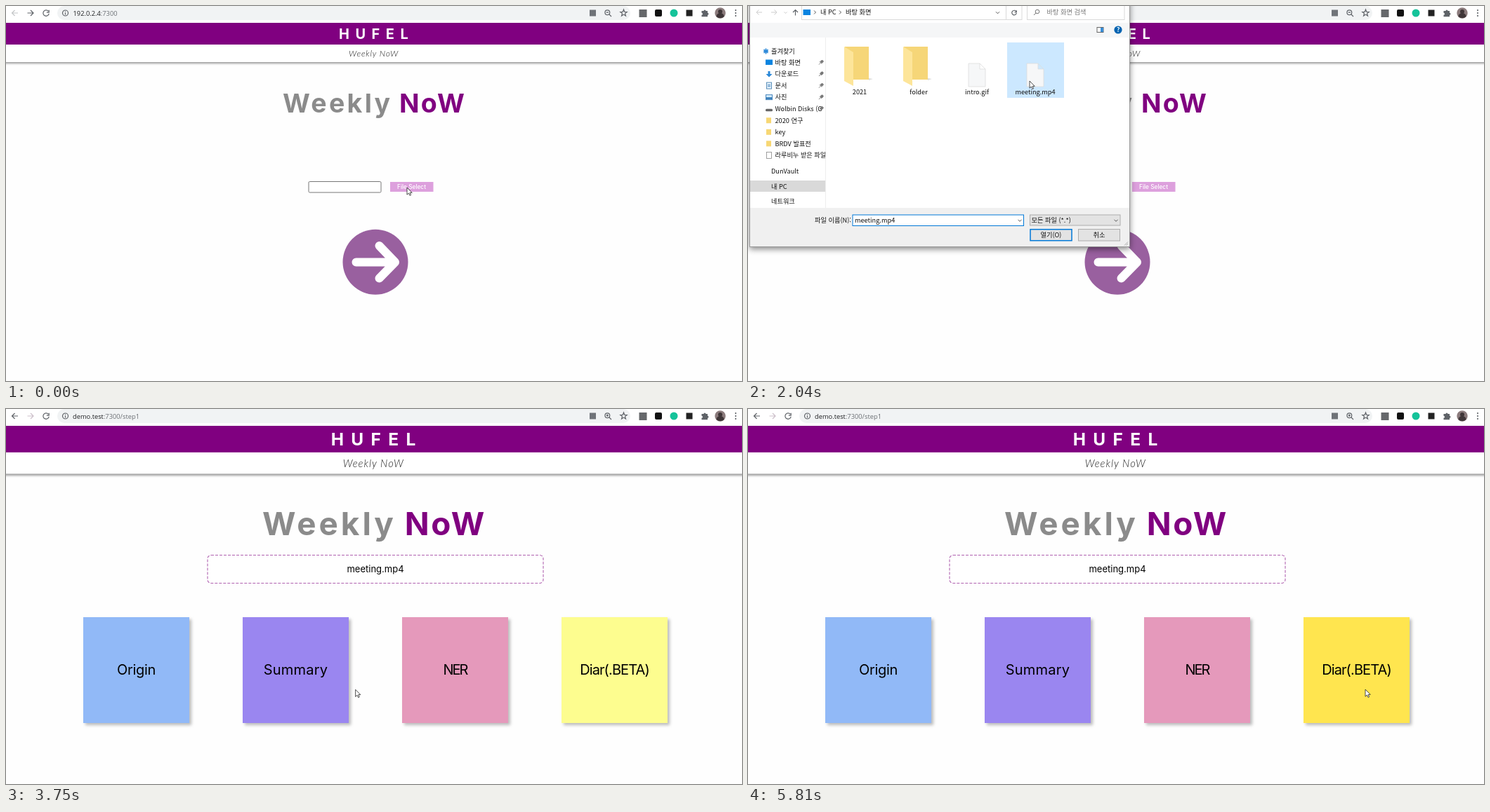
Write an HTML page that moves like this. It is 1048 by 535 pixels and loops after 6370 ms.

```html
<!DOCTYPE html>
<html lang="ko">
<head>
<meta charset="utf-8">
<title>Weekly NoW</title>
<style>
  html, body { margin: 0; width: 100%; height: 100%; overflow: hidden; background: #fefefe; }
  svg { display: block; width: 100%; height: 100%; }
  text { font-family: Inter, sans-serif; white-space: pre; }
  .ui { font: 9.3px "Open Sans", "Noto Sans", sans-serif; fill: #202124; }
  .win text { font: 9.2px "Noto Sans CJK KR", "Noto Sans CJK", sans-serif; fill: #111; }
  .line { fill: none; stroke: #5f6368; stroke-width: 1.2; }
  .mid { text-anchor: middle; }
  .nav { filter: drop-shadow(0 2px 1.5px #0006); }
  .card rect { filter: drop-shadow(3px 3px 2px #0004); }
  .dialog { filter: drop-shadow(0 3px 4px #0007); }
</style>
</head>
<body>
<svg id="stage" viewBox="0 0 1048 535"></svg>
<script>
const LOOP = 6370;
const stage = document.getElementById('stage');

const text = (x, y, s, attrs = '') => `<text x="${x}" y="${y}" ${attrs}>${s}</text>`;
const rect = (x, y, w, h, fill, attrs = '') =>
  `<rect x="${x}" y="${y}" width="${w}" height="${h}" fill="${fill}" ${attrs}/>`;
const path = (d, attrs = 'class="line"') => `<path d="${d}" ${attrs}/>`;
const circle = (x, y, r, attrs) => `<circle cx="${x}" cy="${y}" r="${r}" ${attrs}/>`;
const group = (id, body, attrs = '') => `<g id="${id}" ${attrs}>${body}</g>`;
const chevron = (x, y) => path(`M${x - 2.5} ${y - 1.2}l2.5 2.5 2.5 -2.5`, 'fill="none" stroke="#555"');

const reload = (x, y, r) =>
  path(`M${x + r * .8} ${y - r * .6}A${r} ${r} 0 1 0 ${x + r} ${y + r * .2}M${x + r} ${y - r}v${r * .8}h${-r * .8}`);

const toolbar = rect(0, 0, 1048, 24, '#fff') +
  rect(73, 0, 816, 20, '#f1f3f4', 'rx="10"') +
  path('M17 10H8.500M12.500 6L8.500 10L12.500 14', 'id="back" class="line"') +
  path('M30.500 10H39M35 6L39 10L35 14', 'id="forward" class="line"') +
  group('reload', reload(57, 10, 4.2)) +
  group('stop', path('M53 6L61 14M61 6L53 14')) +
  circle(84.5, 10, 4, 'class="line"') + path('M84.500 9.500V12.500M84.500 7.500V8.500') +
  group('url1', text(95.5, 13.5, '192.0.2.4<tspan fill="#6b6f74">:7300</tspan>', 'class="ui"')) +
  group('url2', text(95, 13.5, 'demo.test<tspan fill="#6b6f74">:7300/step1</tspan>', 'class="ui"')) +
  rect(831, 5.5, 9, 9, '#6f7378') +
  circle(856.3, 9.2, 3.4, 'class="line"') + path('M858.800 11.800L862 15M854.600 9.200H858') +
  path('M856.300 7.500V10.900', 'id="plus" class="line"') +
  path('M879.500 5l1.230 3.300 3.530.150-2.760 2.200.940 3.400-2.940-1.950-2.940 1.950.940-3.400-2.760-2.200 3.530-.150z') +
  rect(901.5, 5, 11, 11, '#66686b') +
  rect(924, 5, 10, 10, '#111', 'rx="2"') +
  circle(951, 10, 5.5, 'fill="#15c39a"') +
  rect(968.5, 5.5, 9, 9, '#222') +
  path('M990.500 7h3a1.500 1.500 0 0 1 3 0h2.500v2.700a1.500 1.500 0 0 1 0 3v2.500h-8.500v-2.500a1.500 1.500 0 0 0 0-3z', 'fill="#5f6368"') +
  circle(1017, 10, 7.7, 'fill="#8b7b7c"') + circle(1017, 8, 3, 'fill="#3f3638"') +
  path('M1011.500 15a5.500 5 0 0 1 11 0a7.700 7.700 0 0 1-11 0', 'fill="#3f3638"') +
  [6, 10, 14].map(y => circle(1039, y, 1.1, 'fill="#5f6368"')).join('');

const header = rect(-50, 24, 1148, 56, '#fff', 'class="nav"') +
  rect(-50, 24, 1148, 31, '#800080') +
  text(474, 47, 'HUFEL', 'font-size="20" font-weight="700" fill="#fff" letter-spacing="8.5"') +
  text(488, 72, 'Weekly NoW', 'style="font:italic 300 12px Lato,sans-serif" fill="#222" letter-spacing=".8"') +
  text(394, 152, 'Weekly', 'font-size="37.5" font-weight="700" fill="#8b8b8b" letter-spacing="3.3"') +
  text(560, 152, 'NoW', 'font-size="37.5" font-weight="700" fill="#800080" letter-spacing="2.2"');

const upload = rect(431, 250.5, 103, 15.5, '#fff', 'rx="1.5" stroke="#767676"') +
  text(433.5, 261, 'meeting.mp4', 'id="chosen" font-size="8.7" font-weight="500"') +
  rect(547, 251, 61.5, 14, '#dda0dd') +
  text(577.5, 261, 'File Select', 'class="mid" font-size="8.3" font-weight="500" fill="#fff"') +
  rect(476, 318.5, 100, 97, '#fff', 'id="focus" rx="2" stroke="#111" stroke-width="1.5"') +
  circle(526, 365.2, 46.5, 'fill="#99609f"') +
  path('M498.500 365.500H553M531.500 342L554 365.500L531.500 388.500',
    'fill="none" stroke="#fff" stroke-width="12" stroke-linecap="round" stroke-linejoin="round"');

const cards = [
  { x: 110, name: 'Origin', base: '#91b9f7', hover: '#7ea5e0', gap: -.3 },
  { x: 337, name: 'Summary', base: '#9a86f0', hover: '#7f6be0', gap: .2 },
  { x: 564, name: 'NER', base: '#e599bb', hover: '#d97fa6', gap: -2 },
  { x: 791, name: 'Diar(.BETA)', base: '#fdfd8f', hover: '#ffe54f', gap: -.9 }
];
const CARD_Y = 297, CARD = 151;

const results = rect(287, 208.5, 478, 40, '#fff', 'rx="5" stroke="#b062b0" stroke-width="1.1" stroke-dasharray="4 2"') +
  text(526, 233, 'meeting.mp4', 'class="mid" font-size="13"') +
  cards.map(c => group(c.name, rect(c.x, CARD_Y, CARD, CARD, c.base) +
    text(c.x + CARD / 2, 379, c.name, `class="mid" font-size="20" letter-spacing="${c.gap}"`), 'class="card"')).join('');

// File dialog
const miniFolder = y => rect(26, y - 4, 7, 8, '#f7d774');
const miniPage = y => rect(26.5, y - 4.5, 7, 9, '#fff', 'stroke="#888" stroke-width=".8"');
const side = [
  ['바탕 화면', y => rect(25, y - 4, 10, 7.5, '#0a84e0')],
  ['다운로드', y => path(`M28.500 ${y - 4}h3v4h3l-4.500 4.500-4.500-4.500h3z`, 'fill="#2b88d8"')],
  ['문서', y => rect(26.5, y - 4.5, 7, 9, '#e3f0fb', 'stroke="#5b8fb9"') + path(`M28 ${y - 1}h4m-4 2h4`, 'stroke="#4a87bd"')],
  ['사진', y => rect(25.5, y - 3.5, 9, 7, '#d5ecfb', 'stroke="#4a87bd"') + rect(26, y, 8, 3, '#3d82bd')],
  ['Wolbin Disks (G', y => rect(25, y, 10, 3.5, '#666', 'rx="1.5"')],
  ['2020 연구', miniFolder],
  ['key', miniFolder],
  ['BRDV 발표전', miniFolder],
  ['라루비누 받은 파일', miniPage]
].map(([name, icon], i) => {
  const y = 80.5 + i * 16.55;
  const pin = i < 5 ? path(`M101 ${y + 3}l2-2m-1-2l3 3m-1.500-4.500l3 3m-1-4l2 2-2.500 2.500-2-2z`, 'fill="#777" stroke="#777"') : '';
  return icon(y) + text(38.5, y + 3.3, name) + pin;
}).join('');

const folder = (x, name) =>
  path(`M${x} 58h34v47h-34z`, 'fill="#f6d678"') +
  path(`M${x - 1} 58l13 8v48l-13-7z`, 'fill="#fde59a"') +
  path(`M${x + 34} 103l6 1-6 2z`, 'fill="#ddd"') +
  text(x + 21, 126, name, 'class="mid"');
const file = (x, name) =>
  path(`M${x - 12} 82h16l8 8v25h-24zM${x + 4} 82v8h8`, 'fill="#f6f7f8" stroke="#dcdcdc" stroke-width=".8"') +
  text(x, 126, name, 'class="mid"');

const dialog = rect(2.5, -10, 541, 353.5, '#fff', 'class="dialog" stroke="#8a8a8a" stroke-width=".8"') +
  path('M20 9h-8m3.500-3.500l-3.500 3.500 3.500 3.500M33 9h8m-3.500-3.500l3.500 3.500-3.500 3.500M51.500 8.500l2 2 2-2', 'fill="none" stroke="#ccc"') +
  path('M67.500 13.500V5.500m-3.500 3.500l3.500-3.500 3.500 3.500') +
  rect(76.5, -3, 313.5, 22.5, 'none', 'stroke="#d9d9d9"') + path('M367.500 0V19', 'stroke="#d9d9d9"') +
  rect(397.500, -3, 138.500, 22.5, 'none', 'stroke="#d9d9d9"') +
  rect(78.5, 5, 10.5, 8, '#0a84e0') +
  path('M94 6.500l2.500 2.500-2.500 2.500M130 6.500l2.500 2.500-2.500 2.500', 'fill="none" stroke="#555"') +
  text(103, 12, '내 PC') + text(139, 12, '바탕 화면') + chevron(355.5, 9.5) + reload(379, 9.5, 3.3) +
  circle(412, 8, 2.8, 'fill="none" stroke="#777"') + path('M410 10l-3 3', 'stroke="#777"') +
  text(425.5, 12, '바탕 화면 검색', 'style="fill:#777"') +
  rect(3, 24, 540, 21, '#f5f6f7') +
  rect(497, 30.5, 9, 7, '#fff', 'stroke="#666"') + rect(502, 31, 4, 6, '#3a8fd8') +
  circle(527, 34, 5.6, 'fill="#0063b1"') + text(527, 37.3, '?', 'class="mid" style="fill:#fff;font-weight:700"') +
  path('M110.500 45V288', 'stroke="#eee"') +
  path('M22 64.500h7M25.500 60.500v8M22.500 62l6 5m0-5l-6 5', 'stroke="#2b88d8" stroke-width="1.6"') +
  text(33, 67.5, '즐겨찾기') + `<g clip-path="url(#sideClip)">${side}</g>` +
  rect(3, 249, 107, 16, '#d9d9d9') +
  text(33, 238.5, 'DunVault') + text(33, 260.5, '내 PC') + text(33, 282, '네트워크') +
  rect(369, 52, 81, 79, '#e5f3ff', 'id="pick"') +
  folder(138, '2021') + folder(222, 'folder') + file(326, 'intro.gif') + file(409, 'meeting.mp4') +
  rect(3, 288, 540, 55, '#f0f0f0') +
  text(95, 309, '파일 이름(N):') +
  rect(149, 298, 243.5, 15.5, '#fff', 'stroke="#0078d7"') + path('M151.500 300V311', 'id="caret" stroke="#111" stroke-width=".8"') +
  text(152, 309, 'meeting.mp4', 'id="typed"') + chevron(387, 306) +
  rect(401.5, 298, 128.5, 15, '#e3e3e3', 'stroke="#adadad"') + text(403.5, 309, '모든 파일 (*.*)') + chevron(524, 306) +
  rect(402, 318.7, 59, 16, '#e3e3e3', 'stroke="#0078d7" stroke-width="1.5"') + text(431.5, 330, '열기(O)', 'class="mid"') +
  rect(470.5, 318.5, 59, 16.5, '#e3e3e3', 'stroke="#adadad"') + text(500, 330, '취소', 'class="mid"') +
  path('M536 341.500l5-5m-2.500 5l2.500-2.500', 'stroke="#aaa"');

const cursor = path('M0 0V10.200L2.400 8L4 11.400L5.600 10.700L4.100 7.400H7.200Z', 'fill="#fff" stroke="#222" stroke-width=".8"') +
  group('busy', circle(13, 6.5, 3.6, 'fill="none" stroke="#2f8fd6" stroke-width="1.8"') +
    circle(13, 6.5, 3.6, 'id="spin" fill="none" stroke="#a8dcf8" stroke-width="1.8" stroke-dasharray="7 20"'));

stage.innerHTML = '<clipPath id="sideClip"><path d="M3 45H110V288H3Z"/></clipPath>' +
  rect(0, 0, 1048, 535, '#fefefe') + group('header', header) + toolbar +
  group('upload', upload) + group('results', results) +
  group('dialog', dialog, 'class="win"') + group('cursor', cursor);

const $ = id => document.getElementById(id);
const show = (id, on) => $(id).setAttribute('visibility', on ? 'inherit' : 'hidden');

// Screen updates: first, last, count
const updates = [
  [150, 310, 3], [460, 850, 6], [1010, 1570, 8], [1650, 2280, 9], [2350, 2970, 9], [3050, 3050, 1],
  [3200, 3350, 3], [3500, 3500, 1], [3650, 4270, 9], [4350, 4960, 9], [5060, 5660, 9], [5740, 5810, 2]
];
function snap(t) {
  let last = 0;
  for (const [a, b, n] of updates)
    for (let i = 0; i < n; i++) {
      const u = n > 1 ? a + (b - a) * i / (n - 1) : a;
      if (u <= t + .01) last = u;
    }
  return last;
}

// Pointer track: time, x, y
const track = [
  [0, 571, 259], [230, 563, 252], [310, 565.5, 253], [1090, 565.5, 253], [1250, 500, 225], [1410, 412, 186],
  [1490, 404.5, 179.5], [1570, 404, 168], [1810, 401, 107], [2430, 401, 107], [2600, 440, 190], [2820, 515, 330],
  [2970, 531, 364], [3050, 535.5, 369.5], [3500, 537, 371], [3650, 532, 378], [3880, 430, 444], [4040, 330, 438],
  [4200, 250, 402], [4350, 239, 394], [4430, 252, 392], [4800, 520, 384], [4960, 552.5, 386], [5060, 562, 387],
  [5500, 850, 400], [5660, 877, 401], [5810, 879, 400]
];
function pointer(t) {
  const i = track.findIndex(p => p[0] > t);
  if (i < 0) return track[track.length - 1].slice(1);
  const [a, x, y] = track[i - 1], [b, x2, y2] = track[i];
  const k = (t - a) / (b - a);
  return [x + (x2 - x) * k, y + (y2 - y) * k];
}

function draw(now) {
  const t = snap(now % LOOP);
  const [x, y] = pointer(t);
  const second = t >= 3500, loading = t >= 3200 && !second;
  const open = t >= 1010 && t < 2350, picked = t >= 1960;

  $('header').setAttribute('transform', second ? 'translate(525 24) scale(1.222) translate(-525 -24)' : '');
  show('upload', !second);
  show('results', second);
  show('url1', !second);
  show('url2', second);
  show('plus', second);
  show('reload', !loading);
  show('stop', loading);
  show('focus', loading);
  $('back').style.stroke = second ? '#5f6368' : '#c4c6c8';
  $('forward').style.stroke = second ? '#cdbfca' : '#5f6368';
  show('chosen', t >= 2420 && !second);

  show('dialog', open);
  $('dialog').style.opacity = Math.min(1, 1 - (t - 2130) / 200);
  show('pick', open && y < 131 && x < 450);
  $('pick').setAttribute('fill', picked ? '#cce8ff' : '#e5f3ff');
  show('typed', open && picked);
  show('caret', open && !picked);

  for (const c of cards) {
    const over = second && x >= c.x && x < c.x + CARD && y >= CARD_Y && y < CARD_Y + CARD;
    $(c.name).firstChild.setAttribute('fill', over ? c.hover : c.base);
  }

  $('cursor').setAttribute('transform', `translate(${x} ${y})`);
  show('busy', t >= 310 && t < 1010);
  $('spin').setAttribute('transform', `rotate(${t * .6} 13 6.5)`);
}

const start = performance.now();
function tick() {
  draw(performance.now() - start);
  requestAnimationFrame(tick);
}
tick();
</script>
</body>
</html>
```
